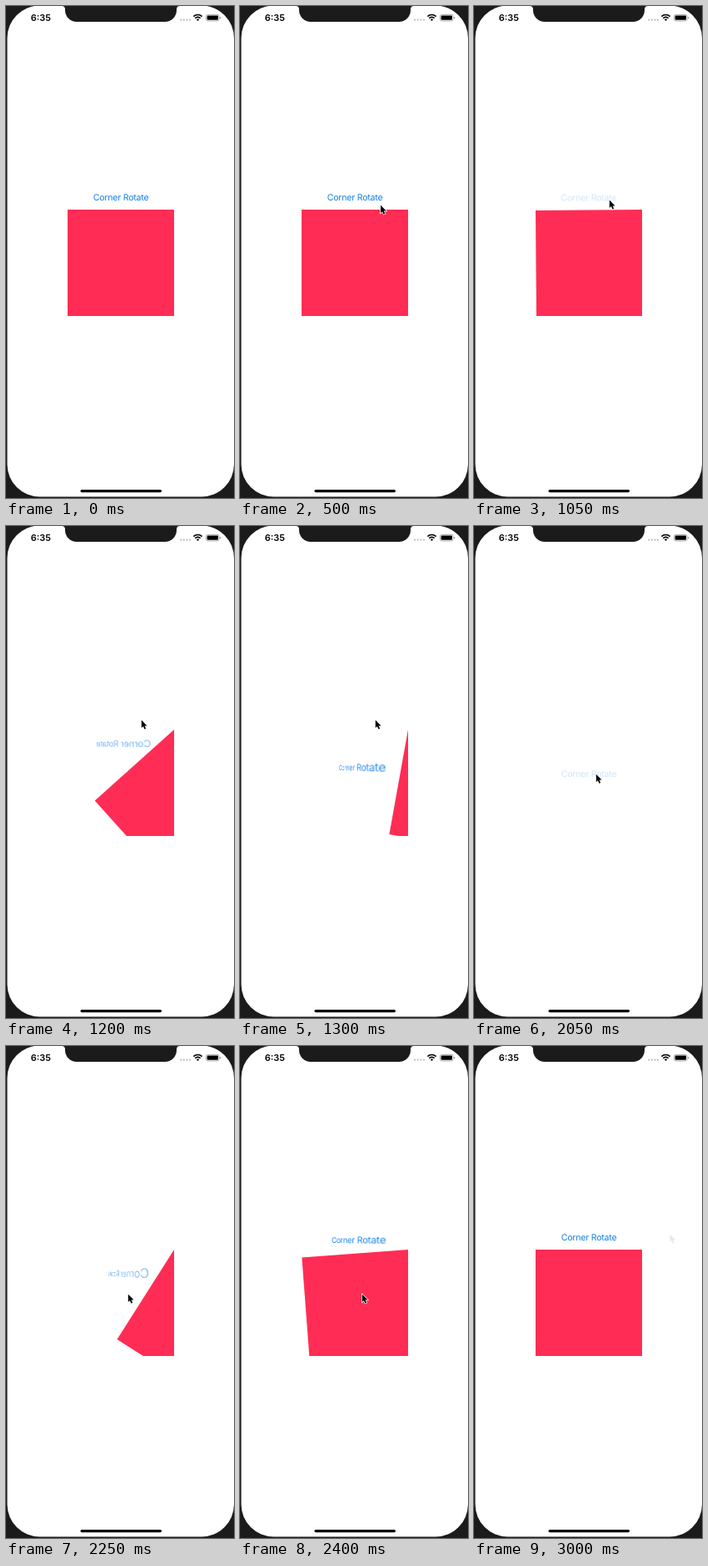
Write an HTML page that moves like this. It is 274x592 px and loops after 4000 ms.

```html
<!DOCTYPE html>
<html lang="en">
<head>
<meta charset="utf-8">
<title>Corner Rotate</title>
<style>
  html, body { margin: 0; width: 100%; height: 100%; overflow: hidden; background: #1b1b1b; }
  #stage { position: relative; width: 274px; height: 592px; overflow: hidden; font-family: Inter, sans-serif; }
  svg { position: absolute; left: 0; top: 0; }
  #label {
    position: absolute; left: 104px; top: 225px; width: 68px; height: 12px;
    display: flex; justify-content: center; white-space: nowrap;
    font-size: 10.6px; line-height: 12px; letter-spacing: -.23px;
    text-rendering: geometricPrecision; color: #1580ea;
  }
  #clip { position: absolute; left: 74px; top: 245px; width: 128px; height: 128px; overflow: hidden; }
  #card { width: 100%; height: 100%; background: #ff2d55; transform-origin: 100% 0; }
</style>
</head>
<body>
<div id="stage">
  <svg width="274" height="592">
    <rect x="1.5" y="-.5" width="272.5" height="591" rx="39" fill="#fff"/>
    <path d="M67 0q4 0 4 4v1a14 14 0 0 0 14 14h106a14 14 0 0 0 14-14v-1q0-4 4-4z" fill="#1b1b1b"/>
    <text x="29.8" y="18" font-size="11" font-weight="600">6:35</text>
    <g fill="#bbb">
      <circle cx="210.2" cy="16.7" r="1.1"/><circle cx="213.8" cy="16.7" r="1.1"/>
      <circle cx="217.4" cy="16.7" r="1.1"/><circle cx="221" cy="16.7" r="1.1"/>
    </g>
    <g fill="none" stroke="#000" stroke-width="1.6">
      <path d="M225.4 12.6a7.2 7.2 0 0 1 10.2 0M227.3 14.7a4.5 4.5 0 0 1 6.4 0"/>
    </g>
    <path d="M230.5 18l-1.7-1.7a2.4 2.4 0 0 1 3.4 0z"/>
    <rect x="240.4" y="10.4" width="15.8" height="7.6" rx="2.2" fill="none" stroke="#999" stroke-width=".8"/>
    <rect x="241.6" y="11.6" width="13.4" height="5.2" rx="1.1"/>
    <path d="M257.2 12.8q1.2 .3 1.2 1.4t-1.2 1.4z" fill="#999"/>
    <rect x="89.5" y="582" width="97.5" height="3.2" rx="1.6"/>
  </svg>
  <div id="label">Corner Rotate</div>
  <div id="clip"><div id="card"></div></div>
  <svg width="274" height="592">
    <path id="pointer" d="M0 0V9.4l2.1-1.9 1.5 3.5 1.7-.7-1.5-3.4h2.9z"
          stroke="#fff" stroke-width="1.4" paint-order="stroke"/>
  </svg>
</div>
<script>
const LOOP = 4000, STEP = 50, DURATION = 350;
const HIDE = { press: 950, start: 1032 };
const SHOW = { press: 2000, start: 2104 };

// Pointer path: time, x, y
const PATH = [
  [150, 235.5, 239.7], [350, 193, 243.5], [500, 169, 239.7], [700, 165, 238.5],
  [850, 162.8, 233.5], [1400, 162.8, 233.5], [1600, 154, 268], [1800, 147.5, 296],
  [1900, 146.8, 298.7], [2650, 146.8, 298.7], [2700, 145.5, 294.7], [2850, 145.5, 294.7],
  [2900, 150, 291], [2950, 172, 268], [3000, 235.5, 226.7]
];

const [label, card, pointer] = ['label', 'card', 'pointer'].map(id => document.getElementById(id));
const lerp = (a, b, k) => a + (b - a) * k;

// Ease-in-out, cubic-bezier(.42, 0, .58, 1)
function ease(x) {
  if (x <= 0) return 0;
  if (x >= 1) return 1;
  let low = 0, high = 1, s;
  for (let i = 0; i < 24; i++) {
    s = (low + high) / 2;
    const bx = 3 * s * (1 - s) * (.42 * (1 - s) + .58 * s) + s ** 3;
    if (bx < x) low = s; else high = s;
  }
  return s * s * (3 - 2 * s);
}

function pointerAt(t) {
  const i = PATH.findIndex(p => p[0] > t);
  if (i < 0) return PATH.at(-1).slice(1);
  if (i === 0) return PATH[0].slice(1);
  const [t0, x0, y0] = PATH[i - 1], [t1, x1, y1] = PATH[i];
  const k = (t - t0) / (t1 - t0);
  return [lerp(x0, x1, k), lerp(y0, y1, k)];
}

function draw(t) {
  const out = ease((t - HIDE.start) / DURATION);
  const back = ease((t - SHOW.start) / DURATION);
  const hidden = out - back;
  const tap = t >= SHOW.press ? back : t >= HIDE.press ? out : 1;

  card.style.transform = `rotate(${-90 * hidden}deg)`;
  card.style.visibility = hidden === 1 ? 'hidden' : 'visible';
  label.style.transform =
    `translateY(${68 * hidden}px) perspective(68px) rotateY(${360 * (out + back) % 360}deg)`;
  label.style.opacity = lerp(.2, 1, tap);

  const [x, y] = pointerAt(t);
  pointer.setAttribute('transform', `translate(${x} ${y})`);
  pointer.setAttribute('fill', t >= 3000 ? '#e9e9e9' : '#000');
  pointer.style.visibility = t < 50 ? 'hidden' : 'visible';
}

const begin = performance.now();
function tick() {
  const t = (performance.now() - begin) % LOOP;
  draw(Math.floor(t / STEP) * STEP);
  requestAnimationFrame(tick);
}
tick();
</script>
</body>
</html>
```
